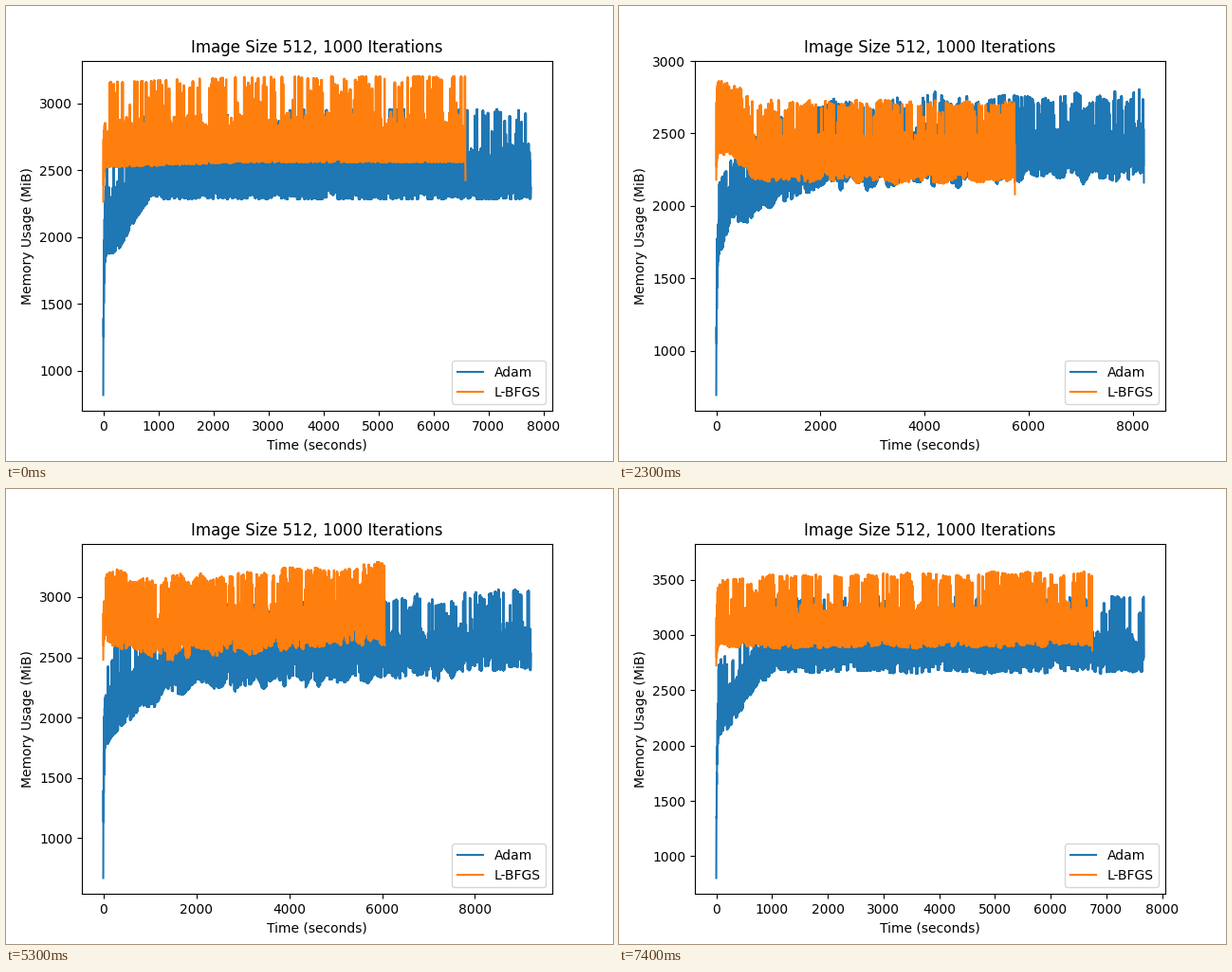
A matplotlib script that plays this animation: 640x480 px, repeating every 8000 ms.

```python
import numpy as np
import matplotlib.pyplot as plt
from matplotlib.animation import FuncAnimation

STEP_MS = 500
LOOP_MS = 8000
SWITCH_MS = (500, 3500, 6500)


def trace(seed, end, low, body, high, last, rise=600, power=2,
          drift=0, wander=0, rough=60, density=0.4):
    """Memory log swinging between a rough floor and a bursty ceiling.

    low, body and high each hold the first, the warm-up and the settled level.
    """
    rng = np.random.default_rng(seed)
    t = np.arange(0, end, 3.0)
    t[-1] = end
    n = int(end // 18) + 1

    def held(seconds, values):
        return values[(t // seconds).astype(int)]

    def sway():
        knots = np.arange(0, end + 150, 150)
        return wander * np.interp(t, knots, rng.uniform(-1, 1, knots.size))

    def level(first, early, late):
        warm = 1 - np.exp(-t / 12)
        settle = 1 - np.exp(-(t / rise) ** power)
        return first + (early - first) * warm + (late - early) * settle + drift * t / end

    floor_sway, top_sway = sway(), sway()
    floor = level(*low) + floor_sway + rough * held(32, rng.random(n)) ** 2
    mid = level(*body) + floor_sway / 2 + top_sway / 2
    peak = level(*high) + top_sway

    chance = density * (0.5 + held(160, rng.random(n)))
    spike = held(18, rng.random(n)) < chance
    burst = held(18, 1 - 0.6 * rng.random(n) ** 3)
    calm = held(18, rng.uniform(-0.3, 0.2, n))
    top = mid + (peak - mid) * np.where(spike, burst, calm)

    v = np.where(np.arange(t.size) % 2, np.maximum(top, floor), floor)
    v[0], v[-1] = low[0], last
    return t, v


# Each chart: time span, value range, then the two traces.
CHARTS = [
    (7775, (820, 3199),
     trace(1, 7775, (820, 1870, 2283), (1130, 2350, 2640), (1130, 2600, 2955), 2370,
           power=3, rough=70, density=0.2),
     trace(2, 6586, (2265, 2525, 2560), (2700, 2830, 2870), (2700, 3160, 3199), 2425,
           rise=1800, rough=20, density=0.4)),
    (8215, (693, 2893),
     trace(3, 8215, (693, 1680, 2130), (885, 1960, 2470), (885, 2130, 2700), 2160,
           rise=800, power=1, drift=70, wander=60, rough=100, density=0.5),
     trace(4, 5737, (2180, 2345, 2165), (2600, 2680, 2470), (2670, 2860, 2710), 2080,
           power=4, wander=25, rough=70, density=0.6)),
    (9203.5, (670, 3311),
     trace(5, 9203.5, (670, 1660, 2210), (1145, 2150, 2550), (1145, 2450, 2850), 2530,
           power=1, drift=190, wander=60, rough=130, density=0.42),
     trace(6, 6058, (2480, 2620, 2490), (2850, 2920, 2830), (2850, 3210, 3120), 2600,
           drift=130, wander=50, rough=110, density=0.65)),
    (7675, (803, 3682),
     trace(7, 7675, (803, 2070, 2665), (1080, 2400, 2990), (1080, 2780, 3340), 2800,
           wander=20, rough=110, density=0.3),
     trace(8, 6749, (2725, 2885, 2885), (3100, 3180, 3240), (3100, 3500, 3540), 2860,
           drift=20, wander=20, rough=70, density=0.5)),
]

fig, ax = plt.subplots(figsize=(6.4, 4.8), dpi=100)
adam, = ax.plot([], [], color="#1f77b4", label="Adam")
lbfgs, = ax.plot([], [], color="#ff7f0e", label="L-BFGS")
ax.set_title("Image Size 512, 1000 Iterations")
ax.set_xlabel("Time (seconds)")
ax.set_ylabel("Memory Usage (MiB)")
ax.legend(loc="lower right")


def padded(low, high):
    pad = 0.05 * (high - low)
    return low - pad, high + pad


def update(i):
    now = i * STEP_MS
    span, limits, *traces = CHARTS[sum(now >= ms for ms in SWITCH_MS)]
    for line, (t, v) in zip((adam, lbfgs), traces):
        line.set_data(t, np.clip(v, *limits))
    ax.set_xlim(padded(0, span))
    ax.set_ylim(padded(*limits))
    return adam, lbfgs


anim = FuncAnimation(fig, update, frames=LOOP_MS // STEP_MS, interval=STEP_MS,
                     repeat=True, repeat_delay=0, blit=False)
plt.show()
```
